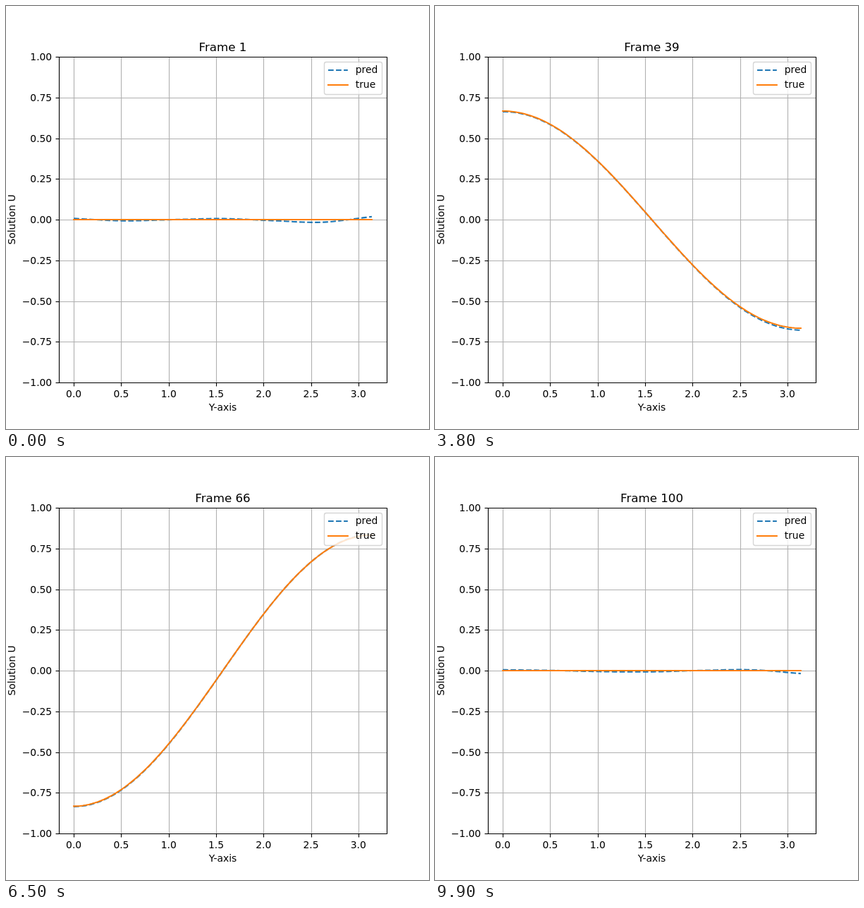
These frames come from a looping animation (600x600 px, 10000 ms). An HTML page with a canvas:

```html
<!DOCTYPE html>
<html lang="en">
<head>
<meta charset="utf-8">
<title>Solution U</title>
<style>
  html, body { margin: 0; width: 100%; height: 100%; overflow: hidden; background: #fff; }
  canvas { display: block; width: 600px; height: 600px; }
</style>
</head>
<body>
<canvas id="plot" width="600" height="600"></canvas>
<script>
const ctx = document.getElementById('plot').getContext('2d');
const BLUE = '#1f77b4', ORANGE = '#ff7f0e';
const STEPS = 100, STEP_MS = 100;
const PT = 100 / 72;
const THIN = 0.8 * PT, THICK = 1.5 * PT;
const BOX = { l: 75, r: 540, t: 72, b: 534 };
const DASH = [3.7 * THICK, 1.6 * THICK];

const X0 = BOX.l + 465 / 22, XS = 465 / 1.1 / Math.PI;
const px = y => X0 + y * XS;
const py = u => 303 - u * 231;
const snap = v => Math.floor(v + 0.5) + 0.5;

// Prediction error in thousandths: [step, values at y = 0, pi/6 ... pi]
const ERRORS = [
  [0, 7, -7, 0, 6, -6, -16, 18],
  [13, 0, -3, -1, 0, -6, -9, 3],
  [22, -4, 0, -1, 0, -5, -7, -9],
  [38, -4, -2, -1, -1, -2, -6, -12],
  [54, 4, -1, -1, -1, 0, 0, 1],
  [66, -3, -3, -2, -1, 0, 0, 4],
  [77, -6, -5, -4, -1, 1, 1, 6],
  [88, -3, -2, -4, -4, 0, 3, -3],
  [99, 5, 1, -6, -7, 1, 5, -18]
];

function errorsAt(step) {
  let k = 0;
  while (k < ERRORS.length - 2 && ERRORS[k + 1][0] <= step) k++;
  const a = ERRORS[k], b = ERRORS[k + 1];
  const f = (step - a[0]) / (b[0] - a[0]);
  return a.slice(1).map((v, i) => (v + (b[i + 1] - v) * f) / 1000);
}

// Catmull-Rom through evenly spaced values, ends extended in a straight line
function spline(v, s) {
  const n = v.length - 1;
  const i = Math.min(n - 1, Math.floor(s)), f = s - i;
  const p1 = v[i], p2 = v[i + 1];
  const p0 = i > 0 ? v[i - 1] : 2 * p1 - p2;
  const p3 = i < n - 1 ? v[i + 2] : 2 * p2 - p1;
  return p1 + 0.5 * f * (p2 - p0 + f * (2 * p0 - 5 * p1 + 4 * p2 - p3 + f * (3 * (p1 - p2) + p3 - p0)));
}

function line(x1, y1, x2, y2) {
  ctx.beginPath();
  ctx.moveTo(x1, y1);
  ctx.lineTo(x2, y2);
  ctx.stroke();
}

function pen(color, width, cap = 'butt', dash = []) {
  ctx.strokeStyle = color;
  ctx.lineWidth = width;
  ctx.lineCap = cap;
  ctx.lineJoin = 'round';
  ctx.setLineDash(dash);
}
const predPen = () => pen(BLUE, THICK, 'butt', DASH);
const truePen = () => pen(ORANGE, THICK, 'square');

function text(str, x, y, align = 'center', pt = 10) {
  ctx.font = `${pt * PT}px "DejaVu Sans", sans-serif`;
  ctx.textAlign = align;
  ctx.fillStyle = '#000';
  ctx.fillText(str, x, y);
}

function curve(u) {
  const n = 99;
  ctx.beginPath();
  for (let i = 0; i <= n; i++) {
    const y = Math.PI * i / n;
    ctx.lineTo(px(y), py(u(y)));
  }
  ctx.stroke();
}

function grid() {
  pen('#b0b0b0', THIN);
  for (let i = 0; i <= 6; i++) {
    const x = snap(px(i / 2));
    line(x, BOX.t, x, BOX.b);
  }
  for (let i = -4; i <= 4; i++) {
    const y = snap(py(i / 4));
    line(BOX.l, y, BOX.r, y);
  }
}

function axes() {
  pen('#000', THIN);
  for (let i = 0; i <= 6; i++) {
    const x = px(i / 2);
    line(snap(x), 534.5, snap(x), 539.5);
    text((i / 2).toFixed(1), x, 555);
  }
  for (let i = -4; i <= 4; i++) {
    const y = py(i / 4);
    line(70.5, snap(y), 75.5, snap(y));
    text((i < 0 ? '\u2212' : '') + Math.abs(i / 4).toFixed(2), 65.2, Math.round(y + 5.1), 'right');
  }
  pen('#000', THIN, 'square');
  ctx.strokeRect(75.5, 72.5, 465, 462);
  text('Y-axis', 307.5, 574);
  ctx.save();
  ctx.translate(13, 303);
  ctx.rotate(-Math.PI / 2);
  text('Solution U', 0, 0);
  ctx.restore();
}

function legend() {
  ctx.beginPath();
  ctx.roundRect(451.5, 79.5, 82, 46, 2.8);
  ctx.fillStyle = 'rgba(255,255,255,0.8)';
  ctx.fill();
  pen('rgba(204,204,204,0.8)', PT);
  ctx.stroke();
  predPen();
  line(457, 91, 484.8, 91);
  truePen();
  line(457, 112, 484.8, 112);
  text('pred', 495.7, 95, 'left');
  text('true', 495.7, 116, 'left');
}

function draw(step) {
  const amp = Math.sin(2 * Math.PI * step / (STEPS - 1));
  const err = errorsAt(step);
  const exact = y => amp * Math.cos(y);

  ctx.fillStyle = '#fff';
  ctx.fillRect(0, 0, 600, 600);
  grid();
  ctx.save();
  ctx.beginPath();
  ctx.rect(BOX.l, BOX.t, BOX.r - BOX.l, BOX.b - BOX.t);
  ctx.clip();
  predPen();
  curve(y => exact(y) + spline(err, y / Math.PI * 6));
  truePen();
  curve(exact);
  ctx.restore();
  axes();
  text('Frame ' + (step + 1), 307.5, 64, 'center', 12);
  legend();
}

const start = performance.now();
let shown = -1;
function tick() {
  const step = Math.floor((performance.now() - start) / STEP_MS) % STEPS;
  if (step !== shown) draw(shown = step);
  requestAnimationFrame(tick);
}
tick();
</script>
</body>
</html>
```
